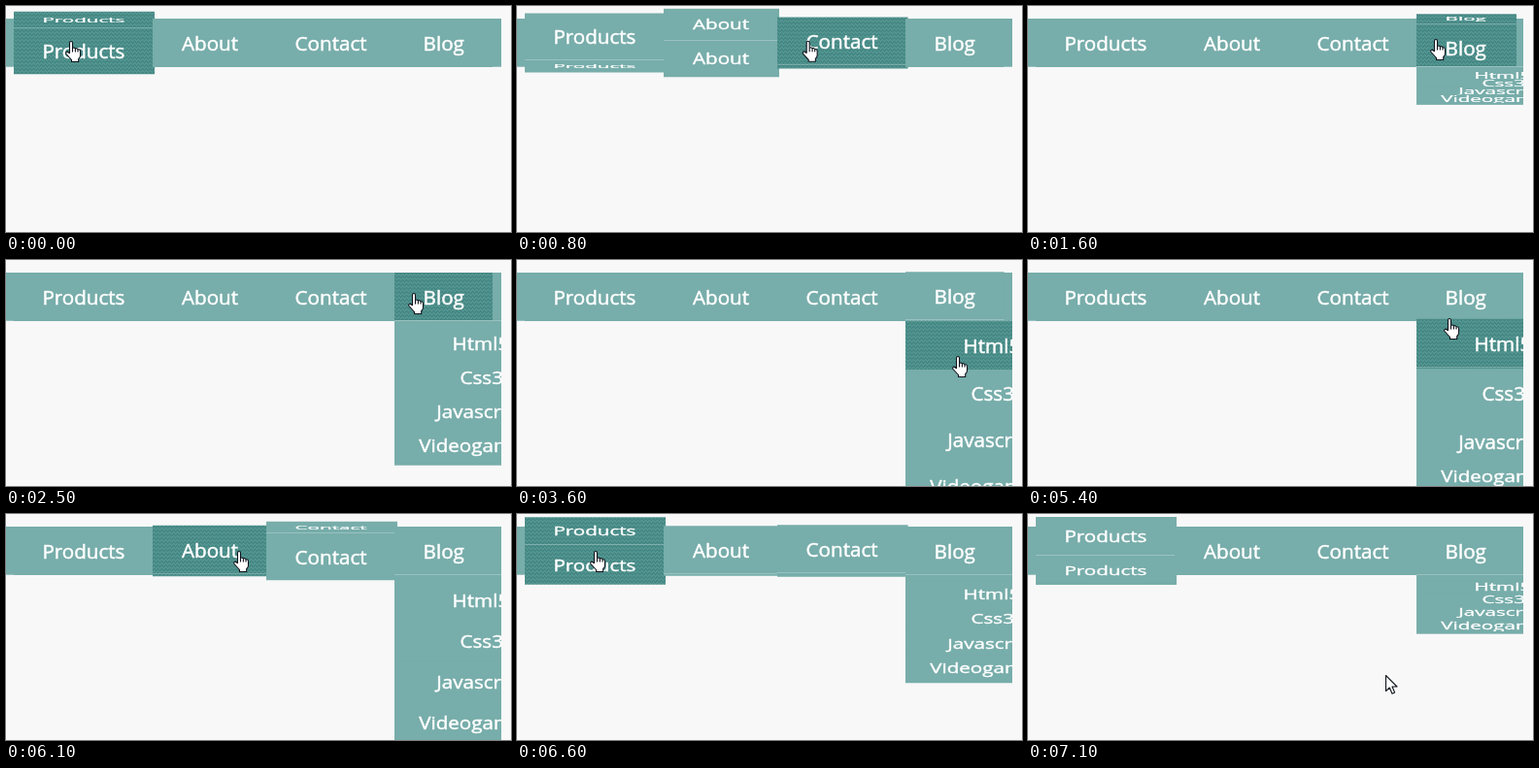
An HTML page with a canvas for the animation above (7.2 s loop, 520x233 px).

```html
<!DOCTYPE html>
<html lang="en">
<head>
<meta charset="utf-8">
<title>Cube menu</title>
<style>
  html, body { margin: 0; width: 100%; height: 100%; overflow: hidden; background: #f8f8f8; }
  canvas { display: block; width: 520px; height: 233px; }
</style>
</head>
<body>
<canvas id="stage" width="520" height="233"></canvas>
<script>
const ctx = document.getElementById('stage').getContext('2d');
const LOOP = 7200, TICK = 100, FACE = 50, RIGHT = 510, SUB_X = 400, SUB_Y = 62;
const TURN = 850, UNFOLD = 3270;
const LIGHT = '#77adaa', SEAM = 'rgba(255,255,255,.25)';
const HELD = [3300, 3500, 6500];

// Toggles are the times at which the pointer enters and leaves.
const menu = [
  { text: 'Products', x: 8,   right: 151, textX: 37.4,  toggles: [-400, 350, 6300, 6850] },
  { text: 'About',    x: 151, right: 268, textX: 181,   toggles: [350, 700, 6060, 6300] },
  { text: 'Contact',  x: 268, right: 401, textX: 297.6, toggles: [750, 1050, 5500, 6040] },
  { text: 'Blog',     x: 400, right: 501, textX: 429.6, toggles: [1120, 2900, 5430, 5520] }
];
const submenu = [
  { text: 'Html5',      textX: 459.6, toggles: [2900, 3880, 5360, 5430] },
  { text: 'Css3',       textX: 467.5, toggles: [3880, 4100, 5230, 5270] },
  { text: 'Javascript', textX: 443.2, toggles: [4100, 4350, 5170, 5220] },
  { text: 'Videogames', textX: 425.2, toggles: [4350, 5100] }
];
const submenuToggles = [1150, 5655];

const pointerPath = [
  [0, 61, 36], [350, 146, 37], [700, 262, 36], [1120, 395, 35], [1300, 414, 34],
  [2600, 414, 34], [2900, 425, 58], [3300, 448, 99], [3600, 448, 99], [3880, 448, 108],
  [4100, 446, 158], [4350, 444, 208], [4600, 442, 214], [5050, 442, 214], [5400, 428, 60],
  [5500, 395, 45], [6040, 262, 38], [6100, 234, 38], [6300, 146, 38], [6600, 75, 38],
  [6850, 120, 62], [7100, 368, 166], [7200, 368, 166]
];

const weave = makeWeave();

function makeWeave() {
  const tile = document.createElement('canvas');
  tile.width = tile.height = 4;
  const g = tile.getContext('2d');
  g.fillStyle = '#4b8e8a';
  g.fillRect(0, 0, 4, 4);
  for (let i = 0; i < 4; i++) {
    g.fillStyle = '#42847f';
    g.fillRect(i, [0, 1, 2, 1][i], 1, 1);
    g.fillStyle = '#589894';
    g.fillRect(i, [2, 3, 0, 3][i], 1, 1);
  }
  return ctx.createPattern(tile, 'repeat');
}

// The CSS "ease" curve, solved by bisection.
function ease(x) {
  if (x <= 0) return 0;
  if (x >= 1) return 1;
  const bezier = (a, b, s) => 3 * a * s * (1 - s) ** 2 + 3 * b * s * s * (1 - s) + s ** 3;
  let low = 0, high = 1;
  for (let i = 0; i < 24; i++) {
    const mid = (low + high) / 2;
    if (bezier(.25, .25, mid) < x) low = mid; else high = mid;
  }
  return bezier(.1, 1, low);
}

// Reversible transition: an interrupted move returns in a shortened time.
function transition(toggles, duration, time) {
  let from = 0, target = 0, since = 0;
  const valueAt = t => {
    const span = target - from;
    return span ? from + span * ease((t - since) / (duration * Math.abs(span))) : from;
  };
  for (const toggle of toggles) {
    if (toggle > time) break;
    from = valueAt(toggle);
    since = toggle;
    target = 1 - target;
  }
  return { value: valueAt(time), on: target === 1 };
}

function label(text, x, y, scaleY) {
  if (scaleY < .1) return;
  ctx.save();
  ctx.translate(x, y);
  ctx.scale(1, scaleY);
  ctx.fillStyle = ctx.strokeStyle = '#fff';
  ctx.lineWidth = .5;
  ctx.fillText(text, 0, 8);
  ctx.strokeText(text, 0, 8);
  ctx.restore();
}

function cube(item, x, right, centerY, size, textScale, time) {
  const { value, on } = transition(item.toggles, TURN, time);
  const angle = value * Math.PI / 2;
  const cos = Math.cos(angle), sin = Math.sin(angle);
  const upper = size * cos, lower = size * sin;
  const top = centerY - (upper + lower) / 2;
  const swell = Math.min(2, 12 * Math.sin(2 * angle));
  const width = Math.min(right + swell, RIGHT) - x;

  ctx.save();
  ctx.beginPath();
  ctx.rect(x, top, width, upper + lower);
  ctx.fillStyle = on ? weave : LIGHT;
  ctx.fill();
  ctx.clip();
  label(item.text, item.textX, top + upper / 2, cos * textScale);
  label(item.text, item.textX, top + upper + lower / 2, sin * textScale);
  ctx.restore();
  if (value > .004 && value < .996) {
    ctx.fillStyle = SEAM;
    ctx.fillRect(x, Math.round(top + upper) - 1, width, 1);
  }
}

function drawSubmenu(time) {
  const open = transition(submenuToggles, UNFOLD, time).value;
  if (open <= 0) return;
  const size = FACE * open;
  const offset = 15 * Math.sqrt(open * (1 - open));
  ctx.fillStyle = LIGHT;
  ctx.fillRect(SUB_X, SUB_Y, RIGHT - SUB_X, 4 * size + offset * 1.4);
  ctx.fillStyle = SEAM;
  ctx.fillRect(SUB_X, SUB_Y, RIGHT - SUB_X, 1);
  submenu.forEach((item, i) => {
    const hovered = transition(item.toggles, TURN, time).on;
    // The first face keeps touching the bar while the list is still unfolding.
    const lift = i === 0 && hovered ? offset / 2 : 0;
    const centerY = SUB_Y + offset + (i + .5) * size - lift;
    cube(item, SUB_X, RIGHT, centerY, size + lift, Math.sqrt(open), time);
  });
}

function outlined(path, x, y) {
  ctx.save();
  ctx.translate(x, y);
  const shape = new Path2D(path);
  ctx.fillStyle = '#fff';
  ctx.strokeStyle = '#10131c';
  ctx.lineWidth = 1.1;
  ctx.lineJoin = 'round';
  ctx.fill(shape);
  ctx.stroke(shape);
  ctx.restore();
}

function drawPointer(time) {
  const next = pointerPath.findIndex(p => p[0] > time);
  const [t0, x0, y0] = pointerPath[next - 1], [t1, x1, y1] = pointerPath[next];
  const k = (time - t0) / (t1 - t0);
  const x = x0 + (x1 - x0) * k, y = y0 + (y1 - y0) * k;
  if (time > 6850) {
    outlined('M.5 .5V16.5L4.3 13L7 19.2L9.6 18L7 12H12Z', x, y);
  } else {
    outlined('M4.5 13V2Q4.5 .5 6 .5T7.5 2V7.5Q9 6.3 10.4 8Q12 7 13 8.8' +
      'Q15.5 8.3 15.5 11V15Q15.5 17 13.7 18.5V21.5H6.5V19.5L1 13.5' +
      'Q.2 11.5 1.6 11.2T4.5 13M7.5 7.5V11.5M10.4 8V11.5M13 8.8V11.5', x, y);
  }
}

function draw(time) {
  ctx.fillStyle = '#f8f8f8';
  ctx.fillRect(0, 0, 520, 233);
  ctx.font = '20.6px "Open Sans", "Noto Sans", sans-serif';
  ctx.fillStyle = LIGHT;
  ctx.fillRect(0, 13, RIGHT, 50);
  ctx.fillStyle = SEAM;
  ctx.fillRect(0, 62, RIGHT, 1);
  for (const item of menu) cube(item, item.x, item.right, 38, FACE, 1, time);
  drawSubmenu(time);
  drawPointer(time);
}

let start;
function play(now) {
  start ??= now;
  let time = Math.floor(((now - start) % LOOP) / TICK) * TICK;
  if (HELD.includes(time)) time -= TICK;
  draw(time);
  requestAnimationFrame(play);
}
requestAnimationFrame(play);
</script>
</body>
</html>
```
